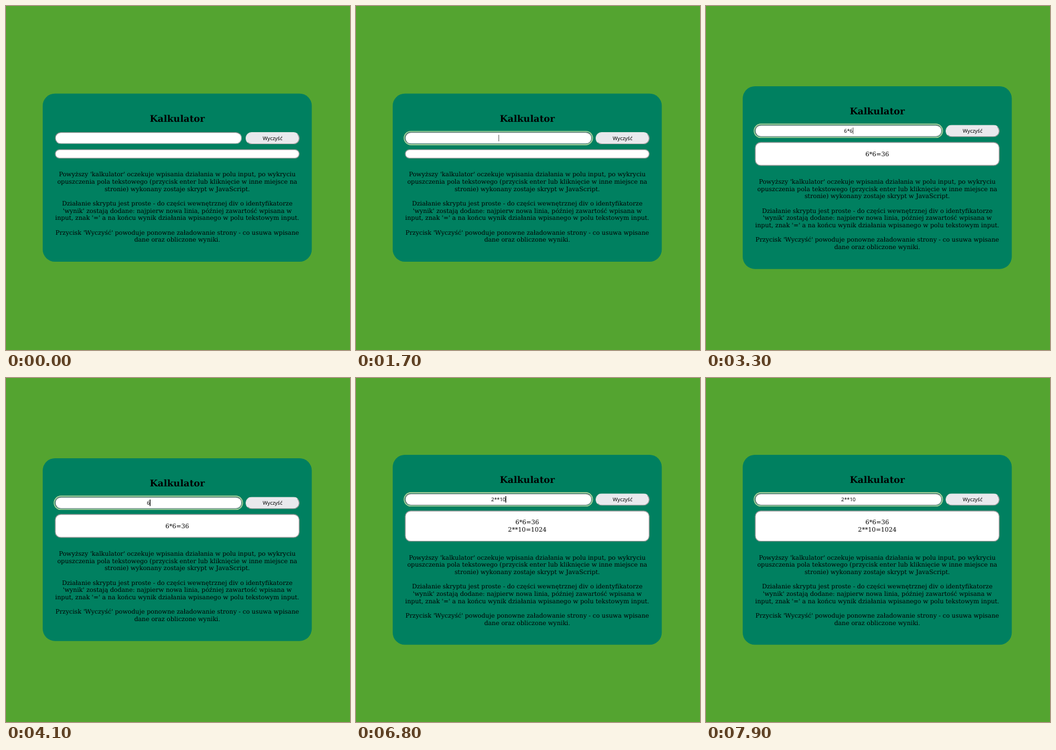
Recreate the animation shown at these times as an HTML page. Size 600 by 600 pixels, loop 8000 ms.

```html
<!DOCTYPE html>
<html lang="pl">
<head>
<meta charset="utf-8">
<title>Kalkulator</title>
<style>
  html, body { margin: 0; width: 100%; height: 100%; overflow: hidden; background: #54a430; }
  #stage {
    position: absolute; width: 900px; height: 900px;
    transform: scale(.666667); transform-origin: 0 0;
    font: 16px/19px "DejaVu Serif", serif; color: #000;
    text-align: center; text-rendering: geometricPrecision;
  }
  #stage div { position: absolute; box-sizing: border-box; white-space: pre; }
  #card { left: 96px; width: 704px; border-radius: 32px; background: #008060; }
  #title { left: 0; right: 0; top: 52px; font: bold 24px/28px "DejaVu Serif", serif; }
  #field, #button { top: 101px; border: 2px solid; border-radius: 16px; font: 13.333px/27px "Noto Sans", sans-serif; }
  #field { left: 32px; width: 489px; height: 31px; background: #fff; border-color: #8c8c8c #b4b4b4 #b4b4b4 #8c8c8c; }
  #field.focus { outline: 2px solid #d3e2a8; outline-offset: 1px; }
  #button { left: 531px; width: 141px; height: 32px; line-height: 28px; background: #e9e9ed; border-color: #e3e3e3 #9a9a9a #9a9a9a #e3e3e3; }
  #caret { display: inline-block; width: 1.3px; height: 17px; margin-right: -1.3px; vertical-align: -4px; background: #000; }
  #result {
    left: 32px; width: 640px; top: 146px; border: 2px solid #999; border-radius: 15px; background: #fff;
    display: flex; align-items: center; justify-content: center;
  }
  #about { left: 0; right: 0; bottom: 48px; }
</style>
</head>
<body>
<div id="stage">
  <div id="card">
    <div id="title">Kalkulator</div>
    <div id="field"><span id="typed"></span><span id="caret"></span></div>
    <div id="button">Wyczyść</div>
    <div id="result"></div>
    <div id="about">Powyższy 'kalkulator' oczekuje wpisania działania w polu input, po wykryciu
opuszczenia pola tekstowego (przycisk enter lub kliknięcie w inne miejsce na
stronie) wykonany zostaje skrypt w JavaScript.

Działanie skryptu jest proste - do części wewnętrznej div o identyfikatorze
'wynik' zostają dodane: najpierw nowa linia, później zawartość wpisana w
input, znak '=' a na końcu wynik działania wpisanego w polu tekstowym input.

Przycisk 'Wyczyść' powoduje ponowne załadowanie strony - co usuwa wpisane
dane oraz obliczone wyniki.</div>
  </div>
</div>
<script>
  const LOOP = 8000, BLINK = 600, CENTER_Y = 449;
  // Moments at which the field is edited or submitted; each restarts the caret blink.
  const edits = [
    [1000, ''], [1700, ''], [2400, '6'], [2600, '6*'], [2800, '6*6'], [3300, '6*6'],
    [4000, '6*'], [4100, '6'], [4200, ''], [5100, '2'], [5500, '2*'], [5700, '2**'],
    [6100, '2**1'], [6300, '2**10'], [6800, '2**10']
  ];
  const results = [[3300, '6*6=36'], [6800, '2**10=1024']];
  const $ = id => document.getElementById(id);
  const setText = (id, text) => { if ($(id).textContent !== text) $(id).textContent = text; };

  function draw() {
    const t = performance.now() % LOOP;
    const past = ([time]) => time <= t;
    const edit = edits.filter(past).pop();
    const lines = results.filter(past).map(([, text]) => text);

    $('field').classList.toggle('focus', !!edit);
    setText('typed', edit ? edit[1] : '');
    $('caret').style.visibility = edit && (t - edit[0]) % (2 * BLINK) < BLINK ? 'visible' : 'hidden';

    setText('result', lines.join('\n'));
    const height = 24 + (lines.length ? 19 * (lines.length + 1) : 0);
    const cardHeight = 416 + height;
    $('result').style.height = height + 'px';
    $('card').style.height = cardHeight + 'px';
    $('card').style.top = CENTER_Y - cardHeight / 2 + 'px';
    requestAnimationFrame(draw);
  }
  draw();
</script>
</body>
</html>
```
